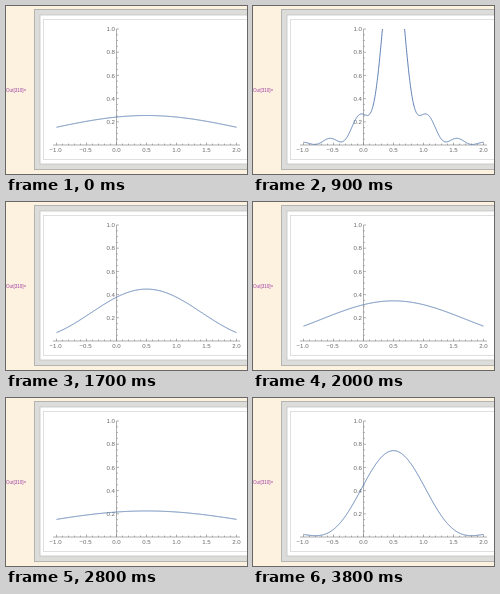
These frames come from a looping animation (241x168 px, 3900 ms). An HTML page:

```html
<!DOCTYPE html>
<html lang="en">
<head>
<meta charset="utf-8">
<title>Slit diffraction</title>
<style>
html, body { margin: 0; width: 100%; height: 100%; overflow: hidden; background: #fdf2e0; }
svg { display: block; width: 241px; height: 168px; }
text { font: 6.1px "Liberation Sans", Arial, sans-serif; fill: #666; }
.out { font-size: 4.6px; fill: #a03ca0; }
#axes { stroke: #777; stroke-width: .6; fill: none; }
#curve { stroke: #5e81b5; stroke-width: 1; fill: none; stroke-linejoin: round; }
</style>
</head>
<body>
<svg viewBox="0 0 241 168">
  <clipPath id="plot"><rect x="48" y="23" width="186" height="118"/></clipPath>
  <rect x="28.5" y="3.5" width="230" height="160" fill="#dcdcda" stroke="#b4b4b0"/>
  <rect x="34" y="9" width="230" height="149" fill="#fff" stroke="#c4c4c4" stroke-width=".8"/>
  <rect x="37.5" y="13.5" width="230" height="140" fill="#fff" stroke="#d8d8d8" stroke-width=".8"/>
  <text class="out" x="0" y="85.5">Out[310]=</text>
  <path id="axes"/>
  <g id="labels"></g>
  <path id="curve" clip-path="url(#plot)"/>
</svg>
<script>
const $ = id => document.getElementById(id);
const px = x => 110.5 + 60 * x;
const py = y => 139 - 116 * y;

function label(text, x, y, anchor) {
  const el = document.createElementNS("http://www.w3.org/2000/svg", "text");
  el.setAttribute("x", x);
  el.setAttribute("y", y);
  el.setAttribute("text-anchor", anchor);
  el.textContent = text;
  $("labels").append(el);
}

function drawAxes() {
  let d = `M47 139H234M110.5 139V23`;
  for (let i = -10; i <= 20; i++) {
    const major = i % 5 === 0;
    d += `M${px(i / 10)} 139v${major ? -2.4 : -1.4}`;
    if (major) label((i / 10).toFixed(1).replace("-", "−"), px(i / 10) - (i < 0 ? 1 : 0), 146.3, "middle");
  }
  for (let i = 1; i <= 20; i++) {
    const major = i % 4 === 0;
    d += `M110.5 ${py(i / 20)}h${major ? 2.4 : 1.4}`;
    if (major) label((i / 20).toFixed(1), 109, py(i / 20) + 2.2, "end");
  }
  $("axes").setAttribute("d", d);
}

// Cumulative Fresnel integrals C and S
const STEP = 0.004, C = [0], S = [0];
for (let i = 0; i < 5000; i++) {
  const phase = Math.PI / 2 * ((i + 0.5) * STEP) ** 2;
  C.push(C[i] + Math.cos(phase) * STEP);
  S.push(S[i] + Math.sin(phase) * STEP);
}
function fresnel(table, u) {
  const k = Math.abs(u) / STEP, i = Math.min(Math.floor(k), 4999);
  return Math.sign(u) * (table[i] + (table[i + 1] - table[i]) * (k - i));
}

// Intensity behind a slit on [0, 1] after spreading for time tau
function intensity(x, tau) {
  const s = Math.sqrt(2 / tau), a = -x * s, b = (1 - x) * s;
  const re = fresnel(C, b) - fresnel(C, a), im = fresnel(S, b) - fresnel(S, a);
  return (re * re + im * im) / 2;
}

const LOOP = 3900;
// [ms, tau] keys, linear in between
const keys = [[0, 3.92], [500, 5], [600, 5], [700, 0.03], [1200, 1.05], [1400, 1.55], [2000, 2.87],
  [2800, 4.44], [3100, 5], [3200, 0.05], [3800, 1.3]];

function tauAt(ms) {
  const i = Math.max(1, keys.findIndex(k => k[0] >= ms));
  const [t0, a] = keys[i - 1], [t1, b] = keys[i];
  return a + (b - a) * (ms - t0) / (t1 - t0);
}

function drawCurve(tau) {
  const points = [];
  for (let i = 0; i <= 720; i++) {
    const x = -1 + i / 240;
    points.push(px(x).toFixed(2) + " " + py(intensity(x, tau)).toFixed(2));
  }
  $("curve").setAttribute("d", "M" + points.join("L"));
}

let shown = -1;
const start = performance.now();
function tick() {
  const ms = Math.floor((performance.now() - start) % LOOP / 100) * 100;
  if (ms !== shown) drawCurve(tauAt(shown = ms));
  requestAnimationFrame(tick);
}
drawAxes();
tick();
</script>
</body>
</html>
```
